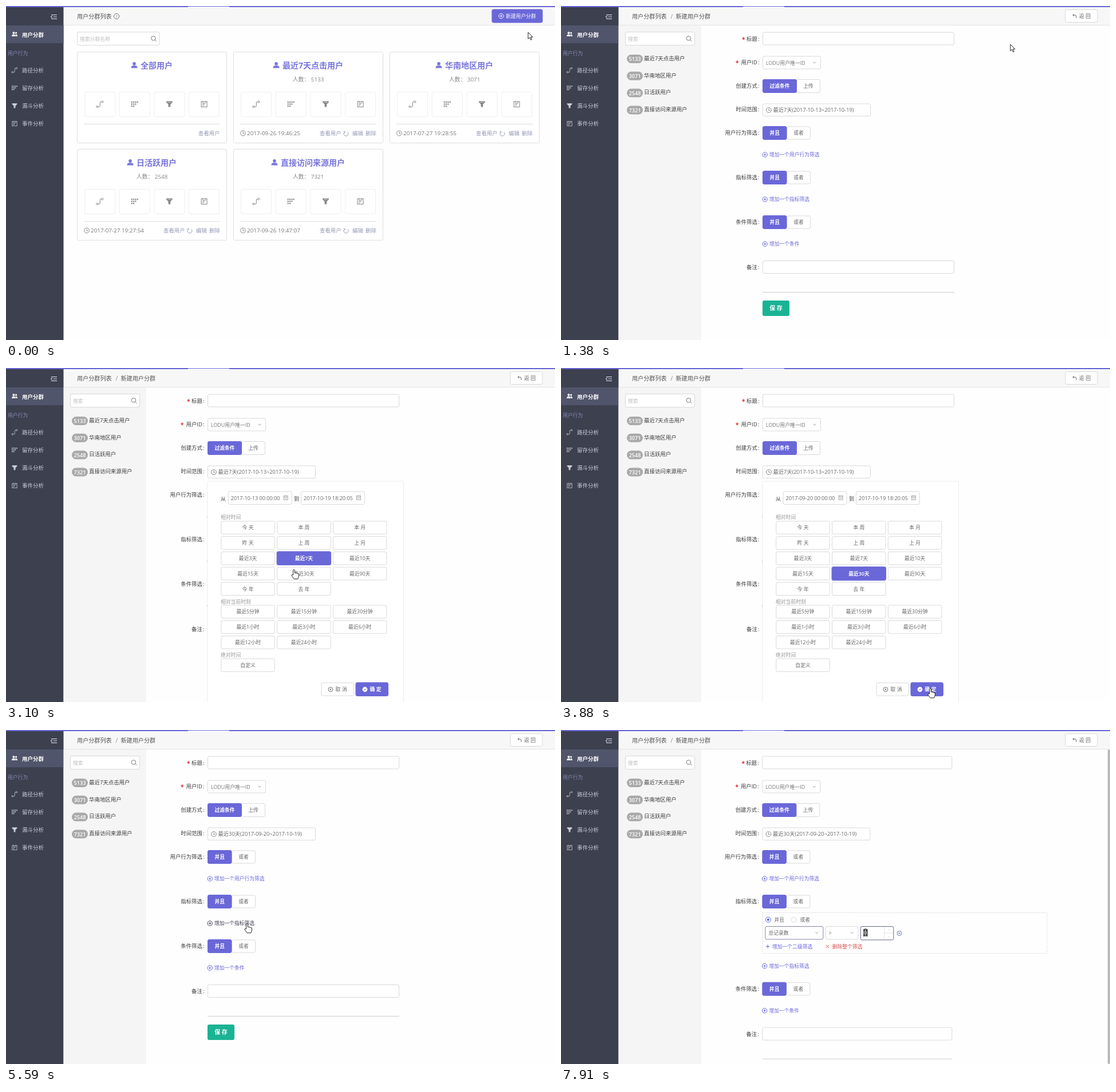
Write an HTML page that moves like this. It is 959x584 px and loops after 8000 ms.

```html
<!DOCTYPE html>
<html lang="zh-CN">
<head>
<meta charset="utf-8">
<title>用户分群</title>
<style>
html, body { margin: 0; width: 100%; height: 100%; overflow: hidden; background: #fefefe; }
svg { display: block; font-family: "Open Sans", "Noto Sans CJK SC", "Noto Sans CJK", sans-serif; }
</style>
</head>
<body>
<svg id="stage" width="959" height="584" viewBox="0 0 959 584"></svg>
<script>
const LOOP = 8000, STEP = 155;   // the screen refreshes once per STEP
const PURPLE = '#6a67d8', LINE = '#d9d9d9', INK = '#3c3c3c', GREY = '#666', PALE = '#bfbfbf';
const MID = 'text-anchor="middle"', END = 'text-anchor="end"', BOLD = 'font-weight="bold"', SEMI = 'font-weight="600"';

// y is the vertical middle of the line of text
const text = (x, y, s, size = 9.4, color = GREY, attrs = '') =>
  `<text x="${x}" y="${y + size * .37}" font-size="${size}" fill="${color}" ${attrs}>${s}</text>`;
const rect = (x, y, w, h, fill, stroke = 'none', r = 0, attrs = '') =>
  `<rect x="${x}" y="${y}" width="${w}" height="${h}" rx="${r}" fill="${fill}" stroke="${stroke}" ${attrs}/>`;
const circle = (x, y, r, fill, stroke = 'none') =>
  `<circle cx="${x}" cy="${y}" r="${r}" fill="${fill}" stroke="${stroke}"/>`;
const path = (d, stroke, fill = 'none', width = 1) =>
  `<path d="${d}" stroke="${stroke}" fill="${fill}" stroke-width="${width}"/>`;
const at = (x, y, body, scale = 1) => `<g transform="translate(${x} ${y}) scale(${scale})">${body}</g>`;
const field = (x, y, w, h = 23, stroke = LINE) => rect(x + .5, y + .5, w - 1, h - 1, '#fff', stroke, 2.5);
const solid = (x, y, w, h, c = PURPLE) => rect(x, y, w, h, c, c, 2.5);
const button = (x, y, w, h, s, on, size = 8.8) =>
  (on ? solid(x, y, w, h) : field(x, y, w, h)) +
  text(x + w / 2, y + h / 2, s, size, on ? '#fff' : GREY, MID + (on ? ' ' + SEMI : ''));

// icons, each centred on 0,0
const icon = {
  path: c => path('M-3.2 4.6H-1Q.3 4.6 .3 3V-2.6Q.3-4 2-4H2.6', c) + circle(-4.7, 4.6, 1.5, 'none', c) + circle(4.3, -4, 1.6, 'none', c),
  grid: c => [4, 3, 2].map((n, r) => [...Array(n).keys()].map(i =>
    rect(-6 + i * 3.3, -4.7 + r * 3.6, 2.1, 2.3, c)).join('')).join(''),
  funnel: c => path('M-5.5-5H5.5V-3.6L1.8.5V5H-1.8V.5L-5.5-3.6Z', 'none', c) + path('M-3.2-3H3.2', '#fff8'),
  event: c => rect(-5, -4.5, 10, 9.5, 'none', c) + path('M-3-1.7H3M-3 .5H1M-3 2.7H-.5M-2.5-5.5V-3M2.5-5.5V-3', c),
  person: c => circle(0, -2.6, 2.8, c) + path('M-5.5 5Q-5.5 .8-2 .8H2Q5.5 .8 5.5 5Z', 'none', c),
  people: c => circle(-1.6, -2, 2, c) + path('M-5 4Q-5 .5-1.6 .5T1.8 4Z', 'none', c) +
    circle(2.6, -2, 1.6, c) + path('M2.3 4Q2.3 2 1.3.6Q4.8-.4 5 4Z', 'none', c),
  search: c => circle(-.6, -.6, 3.8, 'none', c) + path('M2.2 2.2L4.8 4.8', c),
  clock: c => circle(0, 0, 4.4, 'none', c) + path('M0-2.8V.4H2.4', c),
  plus: c => circle(0, 0, 4.2, 'none', c) + path('M-2.2 0H2.2M0-2.2V2.2', c),
  cross: c => circle(0, 0, 4, 'none', c) + path('M-1.6-1.6L1.6 1.6M1.6-1.6L-1.6 1.6', c),
  reload: c => path('M2.6-2.8A4 4 0 1 1-2.2-3.2M-4.2-3.4H-2V-1.4', c),
  down: c => path('M-2.4-1.2L0 1.2L2.4-1.2', c),
  back: c => path('M-1-4L-3-2L-1 0M-3-2H1Q3-2 3 0V3', c),
  calendar: c => rect(-3.5, -3.5, 7, 7, 'none', c) + path('M-3.5-1.2H3.5M-2-4.5V-2.5M2-4.5V-2.5M-2 1H2', c)
};

const pointer = {
  arrow: path('M0 0V11.5L2.7 9L4.6 13.3L6.4 12.5L4.6 8.3H8Z', '#222', '#fff'),
  hand: path('M-1.4 10V1.5Q0-1 1.4 1.5V6.2L5 6.9L8 8L8.7 10L8 13.5L6.8 16.8H.2L-3.8 11.6Q-4.4 9-2.8 9.4Z', '#222', '#fff'),
  beam: path('M-2-6H2M0-6V6M-2 6H2', '#fff', 'none', 2.2) + path('M-2-6H2M0-6V6M-2 6H2', '#222')
};

// step, x, y, shape from that step on
const moves = [
  [0, 912, 46, 'arrow'], [1, 907, 38, 'arrow'], [2, 897, 25, 'hand'], [6, 895, 23, 'hand'], [7, 895, 23, 'hand'],
  [8, 880, 36, 'arrow'], [12, 500, 160, 'arrow'], [15, 411, 181, 'hand'], [17, 411, 181, 'hand'],
  [18, 435, 235, 'arrow'], [20, 503, 352, 'hand'], [22, 508, 356, 'hand'], [25, 645, 560, 'hand'],
  [26, 649, 566, 'hand'], [27, 649, 566, 'arrow'], [28, 649, 566, 'arrow'], [33, 421, 341, 'hand'],
  [35, 421, 338, 'hand'], [39, 421, 338, 'hand'], [45, 430, 351, 'hand'], [46, 430, 351, 'hand'],
  [49, 532, 354, 'beam'], [52, 532, 354, 'beam']
];

function cursor(k) {
  const i = moves.findLastIndex(m => m[0] <= k), a = moves[i], b = moves[i + 1] || a;
  const p = b === a ? 0 : (k - a[0]) / (b[0] - a[0]);
  return at(a[1] + (b[1] - a[1]) * p, a[2] + (b[2] - a[2]) * p, pointer[a[3]]);
}

const segments = [['最近7天点击用户', 5133], ['华南地区用户', 3071], ['日活跃用户', 2548], ['直接访问来源用户', 7321]];

function frameParts() {
  const c = '#c6c9d6';
  const menu = [['path', '路径分析'], ['grid', '留存分析'], ['funnel', '漏斗分析'], ['event', '事件分析']];
  return rect(100.5, 2, 859, 31.5, '#f7f7f7') + rect(100.5, 33, 859, 1, '#e4e4e4') +
    rect(0, 0, 100.5, 584, '#3d404f') + rect(0, 34, 100.5, 31, '#51556b') +
    rect(0, 0, 959, 2, PURPLE) + rect(318, 1, 72, 1, '#fff') +
    path('M79 15.5H89M82.5 19H89M79 22.5H89M81 17.2L78 19L81 20.8', '#e4e6ee') +
    at(15, 49, icon.people('#fff')) + text(28, 50, '用户分群', 9.5, '#fff', SEMI) +
    text(3, 83, '用户行为', 8.8, '#8689b0') +
    menu.map(([n, s], i) => at(15, 112 + i * 31.2, icon[n](c), .82) + text(28, 112.3 + i * 31.2, s, 9.5, c)).join('') +
    text(124, 18, '用户分群列表', 10.15, '#555');
}

function card(x, y, title, count, date) {
  const mid = x + 131, width = 14 * (title.length - (/\d/.test(title) ? .43 : 0)), c = '#9498b5', tint = '#7875de';
  let s = rect(x + .5, y + .5, 261, 159, '#fff', '#dedede', 2) +
    at(mid + 8 - width / 2 - 11, y + 23.5, icon.person(tint)) +
    text(mid + 8, y + 23.5, title, 14, tint, MID + ' ' + BOLD);
  ['path', 'grid', 'funnel', 'event'].forEach((n, i) => {
    s += rect(x + 13.5 + i * 60.7, y + 70.5, 53, 43, '#fff', '#eee', 2) + at(x + 40 + i * 60.7, y + 91.5, icon[n]('#858585'));
  });
  s += rect(x + 12, y + 126, 238, 1, '#ddd');
  if (!count) return s + text(x + 212, y + 142.5, '查看用户', 9.4, c);
  return s + text(mid, y + 48.8, `人数： ${count}`, 9.85, '#858585', MID) +
    at(x + 17, y + 142.5, icon.clock('#888')) + text(x + 24, y + 142.5, date, 9.85, '#777') +
    text(x + 151, y + 142.5, '查看用户', 9.4, c) + at(x + 197, y + 143, icon.reload(c)) +
    text(x + 208, y + 142.5, '编辑', 9.4, c) + text(x + 231, y + 142.5, '删除', 9.4, c);
}

function listPage(k) {
  const dates = ['2017-09-26 19:46:25', '2017-07-27 19:28:55', '2017-07-27 19:27:54', '2017-09-26 19:47:07'];
  return at(193, 18, circle(0, 0, 4.7, 'none', '#777') + text(0, 0, '?', 7.5, '#777', MID)) +
    solid(849, 6, 88, 23, k > 1 ? '#8886e2' : PURPLE) +
    at(865, 17.5, icon.plus('#fff')) + text(873, 17.5, '新建用户分群', 8.8, '#fff') +
    field(124, 45, 144.5, 24) + text(129, 57.5, '搜索分群名称', 8.8, PALE) + at(258, 57, icon.search('#777')) +
    card(124, 80, '全部用户') +
    segments.map(([t, n], i) => card(124 + (i + 1) % 3 * 273, i < 2 ? 80 : 250, t, n, dates[i])).join('');
}

function sidePanel() {
  return rect(100.5, 34, 144.5, 550, '#f5f5f5') + field(112, 45, 122, 24) + text(117, 57.5, '搜索', 8.8, PALE) +
    at(223.5, 57, icon.search('#777')) +
    segments.map(([t, n], i) => {
      const y = 92 + i * 29.8;
      return rect(115, y - 7, 28, 15, '#a9a9a9', 'none', 7.5) + text(129, y + .7, n, 9.2, '#fff', MID + ' ' + SEMI) +
        text(145, y - .7, t, 9.45, INK);
    }).join('');
}

const label = (y, s, star) => text(346.5, y, s + '<tspan dx="1.2">:</tspan>', 9.4, INK, END) +
  (star ? text(star, y + 1, '*', 10, '#d33', BOLD) : '');
const andOr = (y, s) => label(y, s) + button(394, y - 11.5, 42, 23, '或者') + button(352.5, y - 11.5, 41.5, 23, '并且', true);
const addLink = (y, s, c = PURPLE) => at(356.2, y, icon.plus(c)) + text(364, y, s, 8.75, c);

function metricBox(k) {
  const picked = k >= 50;
  return rect(352.5, 319.5, 497, 71, 'none', LINE, 0, 'stroke-dasharray="2 1.5"') +
    circle(362.5, 331.7, 4.5, '#fff', '#5c6cd4') + circle(362.5, 331.7, 2.1, '#5c6cd4') + text(373, 331.7, '并且', 8.8) +
    circle(407.3, 331.7, 4.5, '#fff', LINE) + text(418, 331.7, '或者', 8.8) +
    field(357, 343, 102, 23.5, k >= 45 ? '#8585a8' : LINE) + text(363, 355, '总记录数', 8.8) + at(447.5, 354.5, icon.down('#999')) +
    field(462.5, 343, 57.5, 23.5) + text(468, 355, '&gt;', 8.8) + at(509, 354.5, icon.down('#999')) +
    field(523.5, 343, 58.5, 24.5, picked ? '#66698c' : LINE) + path('M565.5 344V366.5M565.5 355H581', '#e2e2e2') +
    at(573.5, 349.5, icon.down('#bbb'), -.6) + at(573.5, 361, icon.down('#bbb'), .6) +
    (picked ? rect(529, 348, 7, 13, '#222') : '') + text(529.7, 355, '0', 9.2, picked ? '#fff' : GREY) +
    at(591.7, 355.5, icon.cross('#6b78b8')) +
    path('M358.5 378.5H365M361.8 375.2V381.8', PURPLE) + text(369.5, 378.7, '增加一个二级筛选', 8.8, PURPLE) +
    path('M463.5 375.7L469 381.2M469 375.7L463.5 381.2', '#d9534f') + text(474.3, 378.7, '删除整个筛选', 8.8, '#d9534f');
}

function form(k) {
  const open = k >= 37, dy = open ? 74.7 : 0, w = open ? 332 : 335;
  return at(open ? -.6 : 0, 0,
    label(57.5, '标题', 316) + field(352, 45.5, w) +
    label(98.5, '用户ID', 305) + field(352, 87.5, 102) + text(358, 99.5, 'LODU用户唯一ID', 8.9, '#777') + at(443, 99, icon.down('#999')) +
    label(140, '创建方式') + button(411, 128, 42, 24, '上传') + button(352.5, 128.5, 59, 23, '过滤条件', true) +
    label(181, '时间范围') + field(352, 170.5, 189, 22.5) + at(363, 182, icon.clock('#888')) +
    text(370.5, 182, k >= 27 ? '最近30天(2017-09-20~2017-10-19)' : '最近7天(2017-10-13~2017-10-19)', 9.3) +
    andOr(222, '用户行为筛选') + addLink(260, '增加一个用户行为筛选') +
    andOr(300, '指标筛选') + (open ? metricBox(k) : '') +
    addLink(338 + dy, '增加一个指标筛选', k >= 33 && !open ? '#3c3c50' : PURPLE) +
    andOr(378 + dy, '条件筛选') + addLink(416 + dy, '增加一个条件') +
    label(456.5 + dy, '备注') + field(352, 445 + dy, w) +
    rect(352, 500 + dy, w, 1, '#ccc') +
    rect(352, 515 + dy, 47, 27, '#1ab394', 'none', 3) + text(375.5, 528.5 + dy, '保 存', 10, '#fff', MID + ' ' + SEMI)) +
    (open ? rect(955, 34, 4, 550, '#b9b9b9', 'none', 2) : '');
}

function tooltip() {
  return path('M442 162H451L446.5 166Z', 'none', '#555') + rect(350.5, 138, 191.5, 24, '#555', 'none', 3) +
    text(446.5, 150, '2017-10-13 00:00:00~2017-10-19 18:20:02', 9.2, '#fff', MID);
}

function timePopup(k) {
  const chosen = k >= 22 ? '最近30天' : '最近7天';
  const grid = (y, names) => names.split(',').map((s, i) =>
    button(375.3 + i % 3 * 97.8, y + Math.floor(i / 3) * 26.8, 94.5, 23.5, s, s === chosen)).join('');
  const date = (x, s) => field(x, 215.5, 112, 23.5) + text(x + 5, 227.5, s, 9.1) + at(x + 101, 227, icon.calendar('#aaa'));
  return rect(352, 198, 342.5, 400, '#fff', '#ececec', 2) +
    text(375, 229, '从', 9, INK) + date(387.7, `2017-${k >= 22 ? '09-20' : '10-13'} 00:00:00`) +
    text(503, 229, '到', 9, INK) + date(515, '2017-10-19 18:20:05') +
    text(375, 261, '相对时间', 8.8, '#999') +
    grid(267.3, '今 天,本 周,本 月,昨 天,上 周,上 月,最近3天,最近7天,最近10天,最近15天,最近30天,最近90天,今 年,去 年') +
    text(375, 408.3, '相对当前时刻', 8.8, '#999') +
    grid(414.4, '最近5分钟,最近15分钟,最近30分钟,最近1小时,最近3小时,最近6小时,最近12小时,最近24小时') +
    text(375, 502, '绝对时间', 8.8, '#999') + grid(507.8, '自定义') +
    field(550.5, 550, 57, 23.5) + at(567, 562, icon.cross('#777')) + text(575.5, 562, '取 消', 8.9) +
    solid(611, 550, 56.5, 23.5) + circle(627, 562, 4.4, '#fff') +
    path('M625 562L626.6 563.6L629.2 560.6', PURPLE) + text(635.5, 562, '确 定', 8.9, '#fff', SEMI);
}

function spinner(k) {
  let s = '';
  for (let i = 0; i < 4; i++) {
    const a = (18 + i * 90 + (k - 6) * STEP * .3) * Math.PI / 180;
    s += circle(530.5 + 5.7 * Math.cos(a), 150.3 + 5.7 * Math.sin(a), 2.5, i ? '#c2c2c6' : '#8c8c92');
  }
  return s;
}

function formPage(k) {
  const hover = k < 8, c = hover ? '#4a4870' : GREY;
  const fade = k < 8 ? .5 : k < 9 ? .75 : 1;
  return text(191.5, 18, '/', 10.15, '#888') + text(200.5, 18, '新建用户分群', 10.15, '#555') +
    field(880.5, 6, 57, 23, hover ? c : LINE) + at(897, 18, icon.back(c)) + text(905, 17.8, '返 回', 9, c) +
    `<g opacity="${fade}">${sidePanel()}${form(k)}</g>` +
    (k < 8 ? spinner(k) : '') +
    (k === 15 || k === 16 ? tooltip() : '') +
    (k >= 17 && k < 27 ? timePopup(k) : '');
}

const stage = document.getElementById('stage'), start = performance.now();
let shown = -1;

function draw() {
  const k = Math.floor(((performance.now() - start) % LOOP + 30) / STEP);
  if (k !== shown) {
    shown = k;
    stage.innerHTML = rect(0, 0, 959, 584, '#fefefe') + frameParts() + (k < 4 ? listPage(k) : formPage(k)) + cursor(k);
  }
  requestAnimationFrame(draw);
}
draw();
</script>
</body>
</html>
```
